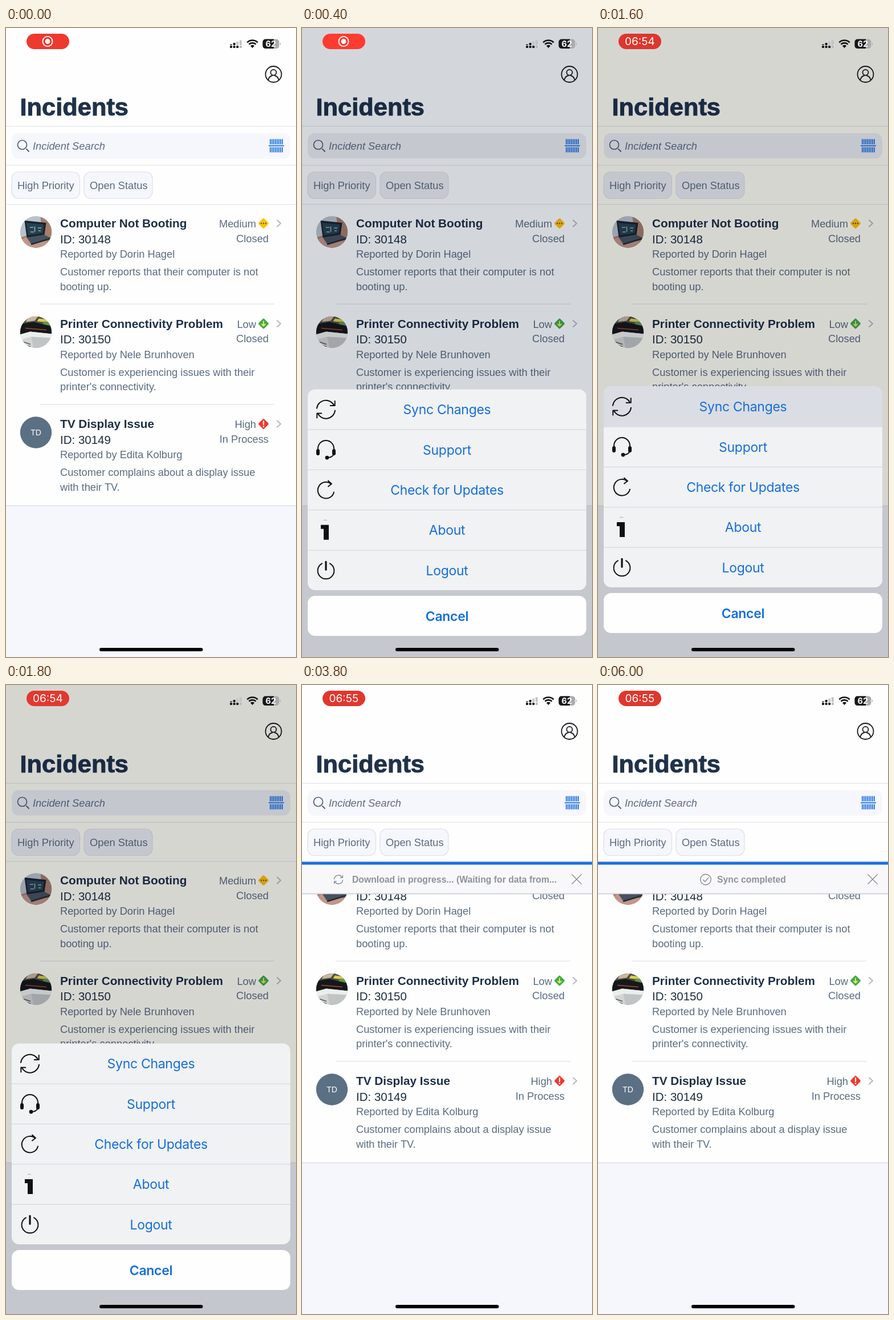
Recreate the animation shown at these times as an HTML page. Size 509 px wide and 1101 px high, loop 6.2 s.

```html
<!DOCTYPE html>
<html lang="en">
<head>
<meta charset="utf-8">
<title>Incidents</title>
<style>
  html, body { margin: 0; width: 100%; height: 100%; overflow: hidden; background: #fefefe; }
  svg { display: block; width: 100vw; height: 100vh; }
  text { font-family: "Liberation Sans", Arial, sans-serif; font-size: 18.3px; fill: #5a6c80; white-space: pre; }
  .h1 { font-size: 43.4px; font-weight: 700; fill: #1f324a; stroke: #1f324a; stroke-width: 1; }
  .title { font-size: 20.75px; font-weight: 700; fill: #1d2f45; }
  .id { font-size: 20.5px; fill: #1d2d3e; }
  .end { text-anchor: end; }
  .mid { text-anchor: middle; }
  .note { font-size: 15.75px; font-weight: 700; fill: #8d939b; }
  .load { font-size: 13.4px; fill: #1d2d3e; }
  .sys { font-family: Inter, sans-serif; }
  .act { font-size: 23px; letter-spacing: -.3px; fill: #146edc; }
  .line { fill: none; stroke-linecap: round; stroke-linejoin: round; }
</style>
</head>
<body>
<svg id="stage" viewBox="0 0 509 1101" preserveAspectRatio="none"></svg>
<script>
const LOOP = 6200, STEP = 200;
const clamp = x => Math.min(1, Math.max(0, x));
const smooth = x => { x = clamp(x); return x * x * (3 - 2 * x); };
const mix = (a, b, k) => `rgb(${a.map((v, i) => Math.round(v + (b[i] - v) * k))})`;

const text = (x, y, s, cls = "", extra = "") => `<text x="${x}" y="${y}" class="${cls}" ${extra}>${s}</text>`;
const rect = (x, y, w, h, fill, r = 0, extra = "") =>
  `<rect x="${x}" y="${y}" width="${w}" height="${h}" rx="${r}" fill="${fill}" ${extra}/>`;
const disc = (x, y, r, fill) => `<circle cx="${x}" cy="${y}" r="${r}" fill="${fill}"/>`;
const line = (d, color, w, extra = "") => `<path class="line" d="${d}" stroke="${color}" stroke-width="${w}" ${extra}/>`;
const shape = (d, fill) => `<path d="${d}" fill="${fill}"/>`;
const at = (x, y, body) => `<g transform="translate(${x} ${y})">${body}</g>`;

// Two chasing arrows around the local zero point
const syncIcon = (r, color, w) => [0, 180].map(a => {
  const k = r * .5;
  return `<g transform="rotate(${a})">` +
    line(`M${-r} ${-r * .12}A${r} ${r} 0 0 1 ${r * .9} ${-r * .42}M${r * .98} ${-r * .42 - k}v${k}h${-k}`, color, w) + "</g>";
}).join("");

const laptop = () => `<g clip-path="url(#face)">` +
  rect(-28, -28, 56, 56, "#b9c3cb") +
  shape("M8 -28H28V28H-28V10L10 -2Z", "#a67f6c") +
  shape("M-28 14L-10 6L28 20V28H-28Z", "#c0978a") +
  shape("M-20 -20L18 -16L15 5L-16 10Z", "#18232f") +
  shape("M-17 -16L14 -13L12 2L-14 6Z", "#27414f") +
  line("M-10 -8h5M-2 -9v8M4 -7h5M-9 0h5M5 -2h3", "#8fb3bd", 1.6) +
  shape("M-16 10L15 5L25 10L-9 20Z", "#46525f") +
  shape("M-9 20L25 10V13L-8 23Z", "#252c35") + "</g>";

const printer = () => `<g clip-path="url(#face)">` +
  rect(-28, -28, 56, 56, "#d3d5d3") +
  rect(-28, -28, 56, 18, "#4b4c42") +
  shape("M-12 -28L4 -28L-2 -20L-18 -18Z", "#c9b7a0") +
  shape("M5 -24L22 -22L20 -17L2 -19Z", "#d8cf4c") +
  shape("M14 -19L28 -17V-11L12 -14Z", "#63944f") +
  shape("M-28 -14L-4 -18L28 -10V3L-10 -1L-28 4Z", "#15181a") +
  line("M-18 -7L18 -4", "#a5432e", 1.6) +
  shape("M-28 4L-10 -1L28 3V10L-8 8L-28 13Z", "#eceeec") +
  shape("M-8 8L28 10V28H-4Z", "#c1c4c5") +
  line("M-22 17L-10 21M-17 23l7 2", "#555b5f", 1.4) + "</g>";

const initials = () => disc(0, 0, 27.7, "#5b7083") + text(0, 5, "TD", "mid", 'style="font-size:14px;fill:#fff"');

const badge = (fill, mark) => rect(-6.8, -6.8, 13.6, 13.6, fill, 2, 'transform="rotate(45)"') + mark;
const badges = {
  Medium: badge("#fcc10d", [-4, 0, 4].map(x => disc(x, 0, 1.2, "#6b5200")).join("")),
  Low: badge("#3eaa4c", line("M0 -4V4M-3 1L0 4L3 1", "#f1e45c", 2)),
  High: badge("#f2362c", line("M0 -5V1", "#fff", 2.2) + disc(0, 4.6, 1.3, "#fff"))
};

const rows = [
  [laptop, "Computer Not Booting", "30148", "Dorin Hagel", "Customer reports that their computer is not", "booting up.", "Medium", "Closed"],
  [printer, "Printer Connectivity Problem", "30150", "Nele Brunhoven", "Customer is experiencing issues with their", "printer's connectivity.", "Low", "Closed"],
  [initials, "TV Display Issue", "30149", "Edita Kolburg", "Customer complains about a display issue", "with their TV.", "High", "In Process"]
];
const row = ([face, title, id, who, l1, l2, level, state], i) => at(0, i * 175.5,
  at(52.5, 357, face()) +
  text(95, 349, title, "title") + text(95, 376.5, "ID: " + id, "id") +
  text(95, 402, "Reported by " + who) + text(95, 433, l1) + text(95, 458.5, l2) +
  text(439, 349, level, "end") + text(461, 374.5, state, "end") +
  at(452, 342, badges[level]) +
  line("M476 336.5L482 342L476 347.5", "#b4b9c1", 2) +
  (i < 2 ? rect(59, 482.5, 412, 1.4, "#e7e7ea", 0, 'class="rule"') : ""));

const scanIcon = () => {
  let s = rect(461, 205.3, 27, 1.7, "#1870e0");
  for (let i = 0; i < 8; i++)
    for (const y of [194.5, 208.5]) s += rect(463 + i * 3, y, 1.8, 9.2, "#1870e0");
  return s;
};

const page = () =>
  rect(0, 0, 509, 1101, "", 0, 'class="soft"') + rect(0, 0, 509, 836, "", 0, 'class="paper"') +
  rect(0, 835.6, 509, 1.4, "#dcdee4") +
  [172, 240.3, 308.6].map(y => rect(0, y - .6, 509, 1.3, "#e7e7ea", 0, 'class="rule"')).join("") +
  `<circle cx="469.5" cy="81" r="14" fill="none" stroke="#17191c" stroke-width="1.8"/>` +
  `<circle cx="469.5" cy="77.8" r="5" fill="none" stroke="#17191c" stroke-width="1.8"/>` +
  line("M460.5 90.5Q462 84.5 467 83.5M472 83.5Q477 84.5 478.5 90.5", "#17191c", 1.8) +
  text(24.5, 153, "Incidents", "h1") +
  rect(10, 184, 489, 44.5, "", 12, 'class="soft"') +
  line("M36 212L40 216", "#4d6073", 2) +
  `<circle cx="28.5" cy="204.5" r="8" fill="none" stroke="#4d6073" stroke-width="1.7"/>` +
  text(47, 213, "Incident Search", "", 'font-style="italic"') + scanIcon() +
  [[10, 119.5, "High Priority"], [137, 120, "Open Status"]].map(([x, w, s]) =>
    rect(x, 252, w, 46.5, "", 12, 'class="soft" stroke="#dddeea" stroke-width="1.2"') + text(x + 10, 282, s)).join("") +
  rows.map(row).join("");

const loader = () => {
  let s = "";
  for (let i = 0; i < 8; i++) s += line("M0 -6V-11", "#70747c", 2.8, `class="line spoke" transform="rotate(${i * 45})"`);
  return at(255, 890, s) + text(254.5, 920, "Loading more items, please wait... (Downloading data... 1.41KB)", "load mid");
};

const banner = () =>
  rect(0, 309.5, 509, 56, "#f8f8fb") + rect(0, 309.5, 509, 5, "#176fe0") + rect(0, 364.6, 509, 1.6, "#cacdd3") +
  line("M474 332L490 348M490 332L474 348", "#858c96", 1.4) +
  `<g id="up">${at(118, 340.5, syncIcon(7.5, "#858c96", 1.4))}${text(138, 346, "Upload in progress... (Uploading...)", "note")}</g>` +
  `<g id="down">${at(64, 340.5, syncIcon(7.5, "#858c96", 1.4))}${text(88, 346, "Download in progress... (Waiting for data from...", "note")}</g>` +
  `<g id="done"><circle cx="189" cy="340.5" r="9.3" fill="none" stroke="#858c96" stroke-width="1.4"/>` +
  line("M184.5 341L187.8 344.2L193.8 337.2", "#858c96", 1.4) + text(209, 346, "Sync completed", "note") + "</g>";

const ink = "#101113";
const actions = [
  ["Sync Changes", syncIcon(16, ink, 2)],
  ["Support", line("M-14 3V-2A14 14 0 0 1 14 -2V3M14 6Q13 13 4 14", ink, 2) +
    rect(-17, -1, 6, 11, ink, 3) + rect(11, -1, 6, 11, ink, 3) + disc(2, 14, 3.4, ink)],
  ["Check for Updates", line("M14 4A14.3 14.3 0 1 1 9 -10.5M4 -16L10 -10.5L4 -6", ink, 2)],
  ["About", shape("M-9 -9H5V17H-4V-2H-9Z", ink) + rect(-4, -18, 6, 1.2, "#b5b6b9")],
  ["Logout", line("M-7 -12A14.4 14.4 0 1 0 7 -12", ink, 2) + line("M0 -15V-1", ink, 3.2)]
];
const sheet = () =>
  rect(10, 627.5, 489, 351.5, "#f1f2f4", 13) +
  `<path id="press" d="M10 697.5V640.5a13 13 0 0 1 13 -13H486a13 13 0 0 1 13 13V697.5Z" fill="#dadde3"/>` +
  actions.map(([label, icon], i) => {
    const y = 662.7 + i * 70.4;
    return (i ? rect(10, y - 35.7, 489, 1.2, "#d6d8dc") : "") + at(42, y, icon) + text(254.5, y + 8.5, label, "sys act mid");
  }).join("") +
  rect(10, 989, 489, 70, "#fefefe", 13) + text(254.5, 1033, "Cancel", "sys act mid", 'font-weight="600"');

const status = () =>
  rect(36, 10, 75, 27, "", 13.5, 'id="pill"') +
  `<g id="rec"><circle cx="73" cy="23.5" r="8.6" fill="none" stroke="#fff" stroke-width="1.8"/>${disc(73, 23.5, 4.4, "#fff")}</g>` +
  text(73.3, 30, "", "sys mid", 'id="clock" style="font-size:19px;fill:#fff"') +
  [0, 1, 2, 3].map(i => rect(393 + i * 5.6, 31, 4, 4, i < 3 ? "#17181a" : "#b9bbbe", 1) +
    rect(393 + i * 5.6, 28.5 - i * 2.4, 4, 1.6 + i * 2.4, i < 2 ? "#17181a" : "#c3c5c8", 1)).join("") +
  shape("M432.5 35L429 31.2A5 5 0 0 1 436 31.2Z", ink) +
  `<g fill="none" stroke="${ink}" stroke-width="2.6"><path d="M426.4 28.7A8.6 8.6 0 0 1 438.6 28.7M423.3 25.3A13 13 0 0 1 441.7 25.3"/></g>` +
  rect(450.5, 19.5, 29, 16.5, "#a9abae", 5) + shape("M470 19.5H455.5a5 5 0 0 0 -5 5V31a5 5 0 0 0 5 5H470Z", "#17181a") +
  shape("M481 25Q483.5 27.7 481 30.5Z", "#a9abae") +
  text(464.8, 33, "62", "sys mid", 'style="font-size:14.5px;font-weight:700;fill:#fff"') +
  rect(164, 1085, 181.5, 6, "#050505", 3);

document.getElementById("stage").innerHTML =
  `<defs><clipPath id="face"><circle r="27.7"/></clipPath></defs>` + page() +
  `<g id="loader">${loader()}</g><g id="banner">${banner()}</g>` +
  rect(0, 0, 509, 1101, "rgb(0,5,30)", 0, 'id="dim"') +
  `<g id="sheet">${sheet()}</g>` + status();

const $ = id => document.getElementById(id);
const all = (sel, key, value) => document.querySelectorAll(sel).forEach((el, i) =>
  el.setAttribute(key, typeof value === "function" ? value(i) : value));
const show = (id, on) => $(id).setAttribute("visibility", on ? "visible" : "hidden");

// Recording pill brightness: time, level
const glow = [[0, .55], [400, 1], [1600, 0], [2600, 1], [3800, .1], [4300, 1], [4800, 0], [5400, 1], [6000, 0], [6200, .5]];
const pulse = t => {
  const i = glow.findIndex(p => p[0] > t), [a, u] = glow[i - 1], [b, v] = glow[i];
  return u + (v - u) * (t - a) / (b - a);
};

const lift = t => {
  const w = Math.max(0, t - 100) * .022;
  return (1 - (1 + w) * Math.exp(-w)) * (1 - smooth((t - 1850) / 300));
};

function draw(t) {
  const up = lift(t), warm = t >= 1400;
  $("sheet").setAttribute("transform", `translate(0 ${(1 - up) * 480})`);
  show("sheet", up > 0);
  show("press", warm && t < 1800);
  $("dim").setAttribute("opacity", .16 * up);
  all(".paper", "fill", mix([254, 254, 254], warm ? [255, 255, 244] : [250, 255, 255], up));
  all(".soft", "fill", mix([246, 246, 253], [235, 237, 241], up));
  all(".rule", "fill", mix([231, 231, 234], [228, 229, 232], up));

  $("pill").setAttribute("fill", mix([221, 55, 46], [252, 59, 49], pulse(t)));
  show("rec", t < 1000);
  $("clock").textContent = t < 1000 ? "" : t < 3200 ? "06:54" : "06:55";

  const drop = clamp((t - 2500) / 220);
  $("banner").setAttribute("transform", `translate(0 ${(drop - 1) * 56})`);
  $("banner").setAttribute("opacity", drop);
  show("up", t < 3200);
  show("down", t >= 3200 && t < 4400);
  show("done", t >= 4400);

  show("loader", t >= 4600 && t < 5400);
  const head = Math.floor(t / 125) + 4;
  all(".spoke", "opacity", i => 1 - .1 * ((head - i + 80) % 8));
}

const start = performance.now();
function tick() {
  const t = (performance.now() - start) % LOOP;
  draw(Math.floor(t / STEP) * STEP);
  requestAnimationFrame(tick);
}
tick();
</script>
</body>
</html>
```
